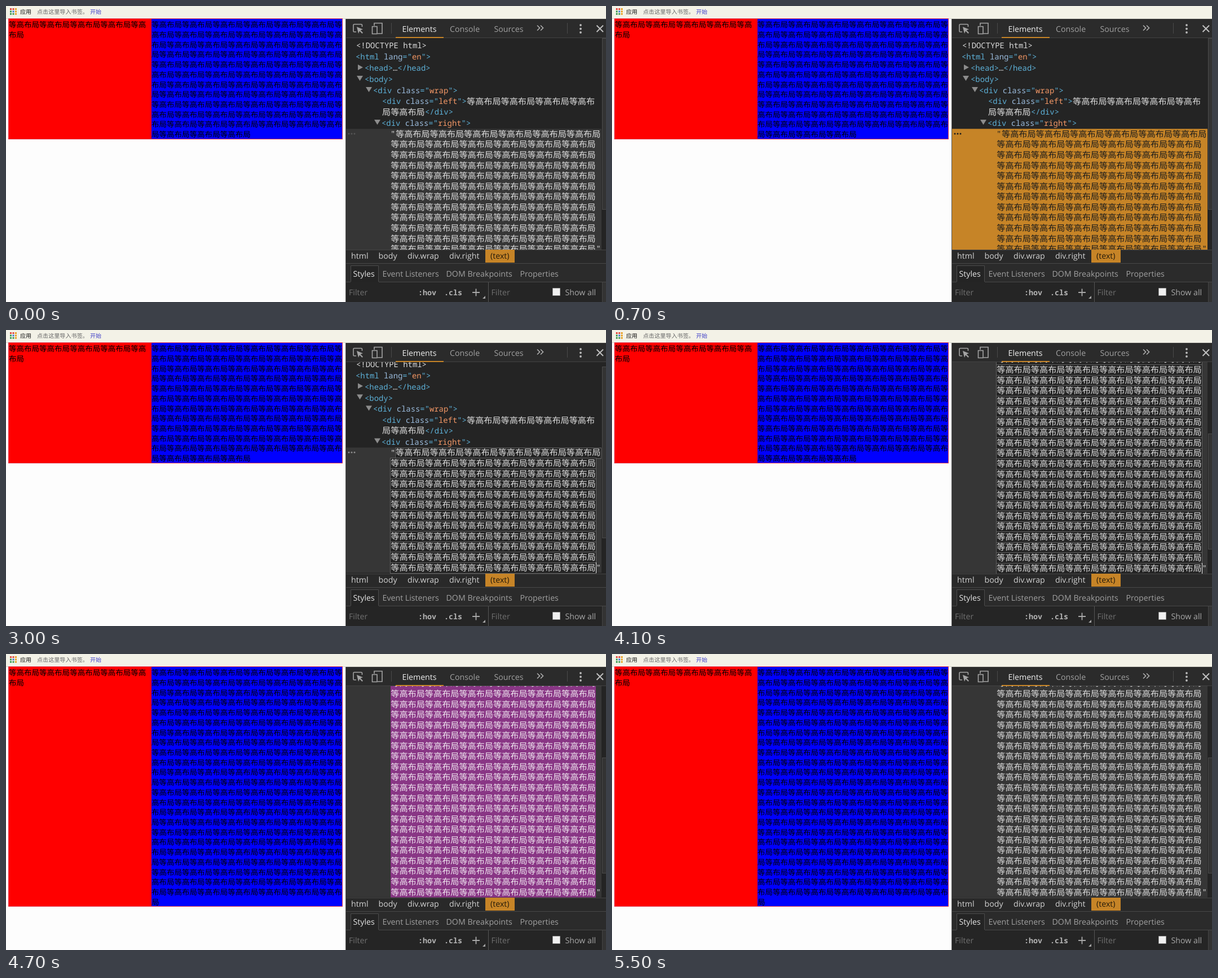
An HTML page with a canvas that plays this animation: 1064 px wide and 526 px high, repeating every 6500 ms.

```html
<!DOCTYPE html>
<html lang="zh-CN">
<head>
<meta charset="utf-8">
<title>Equal height columns</title>
<style>
  html, body { margin: 0; width: 100%; height: 100%; overflow: hidden; background: #fdfdfd; }
  canvas { display: block; }
</style>
</head>
<body>
<canvas id="stage" width="1064" height="526"></canvas>
<script>
const ctx = document.getElementById('stage').getContext('2d');
ctx.textRendering = 'geometricPrecision';

const LOOP = 6500;
const CJK = '"Noto Sans CJK SC", "Noto Sans CJK JP", "Noto Sans CJK", sans-serif';
const UI = '14.2px "Open Sans", "Noto Sans", sans-serif';
const MONO = '13.88px "Noto Sans Mono", "DejaVu Sans Mono", monospace';
const MONO_BOLD = 'bold 13.4px "Noto Sans Mono", "DejaVu Sans Mono", monospace';
const PAGE_SIZE = 13.52, PAGE_LINE = 17.71, PAGE_CHARS = 25;
const CODE_SIZE = 15.15, CODE_LINE = 18.56, CODE_CHARS = 24, CODE_ADVANCE = 8.33;
const VIEW = { x: 603, y: 57, w: 461, h: 376 };
const COLORS = { tag: '#5db0d7', name: '#9bbbdc', value: '#f29766', plain: '#dcdcdc', accent: '#c68427', dark: '#242424' };

// Each phase holds until the next one starts.
const END = { rows: 24, pageRows: 24, scroll: 231.2 };
const EDIT = { mode: 'edit', scroll: 9.5 };
const PHASES = [
  [0, {}],
  [700, { mode: 'hover' }],
  [1300, { mode: 'select' }],
  [3000, { ...EDIT, caret: true }],
  [3500, EDIT],
  [4000, { ...EDIT, rows: 24 }],
  [4100, { ...EDIT, rows: 24, scroll: END.scroll, caret: true }],
  [4600, END],
  [4700, { ...END, flash: 0.8 }],
  [4800, { ...END, flash: 0.55 }],
  [4900, { ...END, flash: 0.35 }],
  [5100, { ...END, flash: 0.18 }],
  [5500, END]
];

function rect(x, y, w, h, color) {
  ctx.fillStyle = color;
  ctx.fillRect(x, y, w, h);
}

function frame(x, y, w, h, color) {
  ctx.strokeStyle = color;
  ctx.lineWidth = 1;
  ctx.strokeRect(x + 0.5, y + 0.5, w - 1, h - 1);
}

function text(str, x, baseline, color, font = UI) {
  ctx.font = font;
  ctx.fillStyle = color;
  ctx.fillText(str, x, baseline);
}

function shape(points, color) {
  ctx.beginPath();
  points.forEach(([x, y]) => ctx.lineTo(x, y));
  ctx.fillStyle = color;
  ctx.fill();
}

function stroke(path, color, width) {
  ctx.strokeStyle = color;
  ctx.lineWidth = width;
  ctx.stroke(new Path2D(path));
}

function dot(x, y, r, color) {
  ctx.beginPath();
  ctx.arc(x, y, r, 0, 7);
  ctx.fillStyle = color;
  ctx.fill();
}

// A run of the repeating phrase, starting at any character of it.
const phrase = (start, count) =>
  Array.from({ length: count }, (_, i) => '等高布局'[(start + i) % 4]).join('');

const cjk = (str, x, y, color, size) => text(str, x, y, color, `${size}px ${CJK}`);

function drawBookmarks() {
  rect(0, 0, 1064, 22, '#f3f2e7');
  rect(0, 22, 1064, 1, '#d6d5cc');
  const dots = ['#e0443a', '#e0443a', '#e8a020', '#3a9a50', '#3f78d8', '#e8a020', '#3a9a50', '#3a9a50', '#e8a020'];
  dots.forEach((color, i) => rect(7 + i % 3 * 4.5, 4 + Math.floor(i / 3) * 4.3, 3, 3, color));
  cjk('应用', 25, 14, '#111', 10);
  cjk('点击这里导入书签。', 55, 14, '#666', 10.1);
  cjk('开始', 149, 14, '#4040c8', 10.1);
}

function drawPage(rows) {
  const height = Math.round(rows * PAGE_LINE);
  const total = rows === 12 ? 288 : 576;
  rect(0, 23, 602, 503, '#fdfdfd');
  rect(5, 23, 253, height, '#f00');
  rect(258, 23, 338, height, '#00f');
  frame(4, 22, 593, height + 2, '#e0304a');
  cjk(phrase(0, 18), 5, 38.3, '#000', PAGE_SIZE);
  cjk(phrase(18, 2), 5, 56, '#000', PAGE_SIZE);
  for (let i = 0; i < rows; i++) {
    const start = i * PAGE_CHARS;
    cjk(phrase(start, Math.min(PAGE_CHARS, total - start)), 258, 38.3 + i * PAGE_LINE, '#000', PAGE_SIZE);
  }
}

// Draws [colour, string] pieces of monospaced code one after another.
function code(x, y, ...pieces) {
  for (const [kind, str] of pieces) {
    text(str, x, y + 5, COLORS[kind], MONO);
    x += str.length * CODE_ADVANCE;
  }
}

const openTag = (tag, name, value) => [
  ['tag', `<${tag} `], ['name', name], ['tag', '="'], ['value', value], ['tag', '">']
];

const arrowDown = (x, y) => shape([[x, y - 5], [x + 11, y - 5], [x + 5.5, y + 4]], '#8c8c8c');

function drawMarkup(scroll) {
  const y = base => base - scroll;
  code(621, y(70), ['plain', '<!DOCTYPE html>']);
  code(620, y(90), ...openTag('html', 'lang', 'en'));
  shape([[624, y(104)], [633, y(109)], [624, y(114)]], '#8c8c8c');
  code(636, y(110), ['tag', '<head>'], ['plain', '…'], ['tag', '</head>']);
  arrowDown(622, y(129));
  code(636, y(130), ['tag', '<body>']);
  arrowDown(638, y(149));
  code(651, y(149.5), ...openTag('div', 'class', 'wrap'));
  code(667, y(169.3), ...openTag('div', 'class', 'left'));
  cjk(phrase(0, 15), 817, y(175), COLORS.plain, CODE_SIZE);
  cjk(phrase(15, 5), 667, y(193.5), COLORS.plain, CODE_SIZE);
  code(743, y(188), ['tag', '</div>']);
  arrowDown(653, y(207));
  code(666, y(208), ...openTag('div', 'class', 'right'));
}

function drawTextNode({ mode, rows, scroll, caret, flash }) {
  const top = 218.3 - scroll;
  const height = rows * CODE_LINE;
  const ink = { hover: '#1c1c1c', select: '#fff' }[mode] || (flash ? '#f0e6f0' : COLORS.plain);
  const quoteInk = mode === 'hover' ? ink : COLORS.plain;
  rect(603, top, 453, height, mode === 'hover' ? COLORS.accent : '#363636');
  const dots = { hover: '#1c1c1c', edit: '#8a8a8a' }[mode] || '#555';
  for (let i = 0; i < 3; i++) dot(608 + i * 5, top + 8.7, 1.5, dots);

  for (let i = 0; i < rows; i++) {
    const x = i ? 682 : 690.5;
    const y = top + i * CODE_LINE;
    const last = i === rows - 1;
    if (mode === 'edit') {
      rect(x - 1, y, 366, CODE_LINE, COLORS.dark);
      frame(Math.round(x) - 1, Math.round(y), 366, 20, '#626262');
    } else if (mode === 'select') {
      rect(x, y, (last ? 1046 : 1055) - x, CODE_LINE + 0.5, '#1263c8');
    }
  }
  if (flash) rect(682, top, 364, height, `rgba(158,54,153,${flash})`);
  for (let i = 0; i < rows; i++)
    cjk(phrase(0, CODE_CHARS), i ? 682.3 : 691, top + i * CODE_LINE + 14.6, ink, CODE_SIZE);

  text('"', 682, top + 14, quoteInk, MONO);
  text('"', 1046.5, top + (rows - 1) * CODE_LINE + 14, quoteInk, MONO);
  if (mode === 'select') rect(689, top, 1, CODE_LINE, '#111');
  if (caret) rect(1046, Math.round(top + (rows - 1) * CODE_LINE), 1, 19, '#f0f0f0');
}

function drawScrollbar({ rows, scroll }) {
  const content = 240.5 + rows * CODE_LINE;
  const ratio = VIEW.h / content;
  const thumbY = Math.round(VIEW.y + scroll * ratio);
  const thumbHeight = Math.round(VIEW.h * ratio);
  rect(1057, VIEW.y, 7, VIEW.h, '#242424');
  rect(1057, thumbY, 7, thumbHeight, '#333');
  frame(1057, thumbY, 8, thumbHeight, '#4b4b4b');
}

function drawElements(state) {
  ctx.save();
  ctx.beginPath();
  ctx.rect(VIEW.x, VIEW.y, VIEW.w, VIEW.h);
  ctx.clip();
  rect(VIEW.x, VIEW.y, VIEW.w, VIEW.h, COLORS.dark);
  drawMarkup(state.scroll);
  drawTextNode(state);
  drawScrollbar(state);
  ctx.restore();
}

function drawToolbar() {
  const icon = '#a4a4a4';
  rect(603, 23, 461, 34, '#2b2b2b');
  rect(603, 56, 461, 1, '#434343');
  stroke('M621 46H617.5Q616 46 616 44.5V34Q616 32.5 617.5 32.5H630Q631.5 32.5 631.5 34V37', icon, 1.6);
  shape([[622, 37], [633, 41.5], [628.6, 43], [633, 47.5], [631.5, 49], [627, 44.6], [625, 49]], icon);
  stroke('M653 35V30.5H667V49H659M649.5 36.5H658V49.5H649.5Z', icon, 1.6);
  rect(683, 30, 1, 19, '#4a4a4a');
  rect(995, 30, 1, 19, '#4a4a4a');
  text('Elements', 702.5, 45.5, '#eee');
  text('Console', 787, 45.5, '#a0a0a0');
  text('Sources', 865.5, 45.5, '#a0a0a0');
  rect(691, 55, 85, 2, COLORS.accent);
  stroke('M942 34.5L946.5 39L942 43.5M948 34.5L952.5 39L948 43.5', '#b0b0b0', 1.6);
  for (const y of [34, 40.5, 47]) dot(1019, y, 1.9, '#b8b8b8');
  stroke('M1047.5 34.5L1059 46M1059 34.5L1047.5 46', '#c0c0c0', 2);
}

function drawBreadcrumbs() {
  rect(603, 433, 461, 24, '#292929');
  rect(603, 433, 461, 1, '#444');
  rect(850, 433, 52, 23, COLORS.accent);
  [['html', 612], ['body', 660.5], ['div.wrap', 712], ['div.right', 786]]
    .forEach(([label, x]) => text(label, x, 449, '#d2d2d2'));
  text('(text)', 859, 449, '#241a0a');
  rect(603, 457, 461, 1, '#484848');
}

function drawStyles() {
  rect(603, 458, 461, 33, '#2b2b2b');
  rect(603, 490, 461, 36, '#252525');
  rect(603, 490, 461, 1, '#484848');
  rect(611, 461, 50, 30, '#242424');
  stroke('M611.5 490V461.5H660.5V490', '#4c4c4c', 1);
  text('Styles', 615.5, 481, '#e4e4e4');
  [['Event Listeners', 667.5], ['DOM Breakpoints', 780.5], ['Properties', 911.5]]
    .forEach(([label, x]) => text(label, x, 481, '#a0a0a0'));
  text('Filter', 608, 514, '#707070');
  text(':hov', 731, 513.5, '#b4b4b4', MONO_BOLD);
  text('.cls', 777, 513.5, '#b4b4b4', MONO_BOLD);
  stroke('M827 509H840M833.5 502.5V515.5', '#a8a8a8', 1.8);
  shape([[850, 515], [850, 520], [845, 520]], '#a8a8a8');
  rect(855, 491, 1, 35, '#555');
  text('Filter', 860.5, 514, '#707070');
  ctx.beginPath();
  ctx.roundRect(969.5, 501.5, 13, 13, 2);
  ctx.fillStyle = '#f0f0f0';
  ctx.fill();
  stroke('M969.5 501.5H982.5V514.5H969.5Z', '#9a9a9a', 1);
  text('Show all', 991.5, 514, '#a8a8a8');
  rect(1057, 491, 7, 35, '#333');
  rect(1057, 491, 1, 35, '#444');
}

function draw(now) {
  const time = now % LOOP;
  const phase = PHASES.findLast(([start]) => time >= start)[1];
  const state = { rows: 12, pageRows: 12, scroll: 0, ...phase };
  drawBookmarks();
  drawPage(state.pageRows);
  drawElements(state);
  drawToolbar();
  drawBreadcrumbs();
  drawStyles();
  rect(602, 23, 1, 503, '#555');
  requestAnimationFrame(draw);
}
requestAnimationFrame(draw);
</script>
</body>
</html>
```
